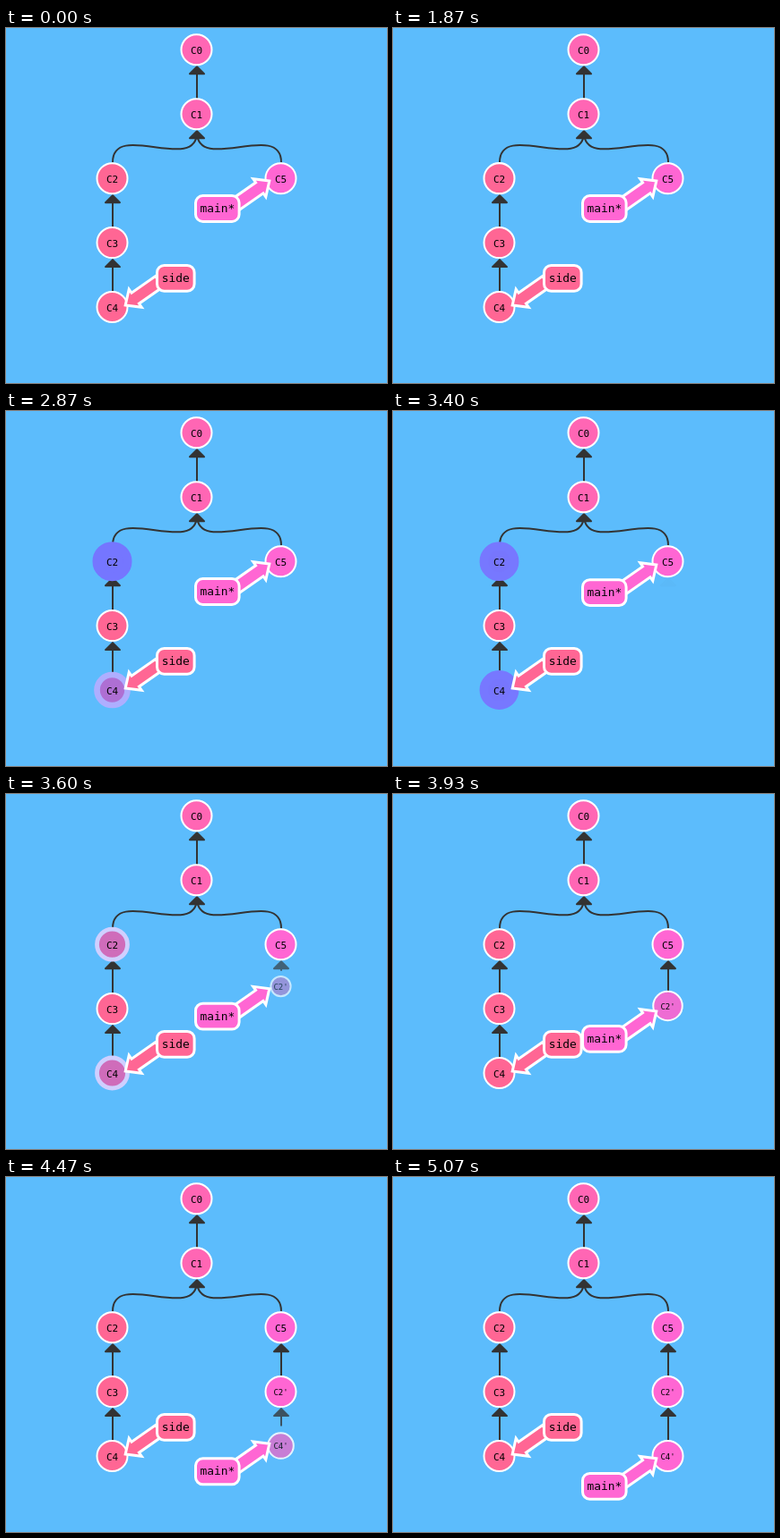
An HTML page that plays this animation: 425 by 397 pixels, repeating every 5140 ms.

```html
<!DOCTYPE html>
<html lang="en">
<head>
<meta charset="utf-8">
<title>Commit graph</title>
<style>
  html, body { margin: 0; width: 100%; height: 100%; overflow: hidden; background: #5cbcfc; }
  svg { display: block; }
  text { font-family: "DejaVu Sans Mono", "Noto Sans Mono", monospace; text-anchor: middle; fill: #000; }
  .edge { fill: none; stroke: #333; stroke-width: 2; }
  .head { fill: #333; stroke: #333; stroke-width: 2; stroke-linejoin: round; }
  .tag { stroke: #fff; stroke-width: 3; }
</style>
</head>
<body>
<svg id="stage" width="425" height="397" viewBox="0 0 425 397"></svg>
<script>
const LOOP = 5140, FPS = 15;
const LEFT = 118.5, MID = 212.5, RIGHT = 306.5;
const ROW = 71.93, R = 17;
const row = i => 24.3 + ROW * i;

const ROOT_FILL = [255, 102, 180], SIDE_FILL = [255, 102, 148], MAIN_FILL = [255, 102, 211];
const GLOW = [117, 118, 255], WHITE = [255, 255, 255], NEWBORN = [36, 179, 179];

// Start times and lengths in ms
const MOVE = 400, BIRTH = 800, HIGHLIGHT = 430;
const GLOW_C2 = 1838, GLOW_C4 = 2630, PICK_C2 = 3365, PICK_C4 = 4200;

const stage = document.getElementById('stage');

function add(parent, name, attrs, text) {
  const el = document.createElementNS('http://www.w3.org/2000/svg', name);
  set(el, attrs);
  if (text) el.textContent = text;
  parent.appendChild(el);
  return el;
}

function set(el, attrs) {
  for (const key in attrs) el.setAttribute(key, attrs[key]);
}

const rgb = c => `rgb(${c.map(Math.round).join(',')})`;
const mix = (a, b, p) => a.map((v, i) => v + (b[i] - v) * p);
const part = (t, start, length) => Math.min(1, Math.max(0, (t - start) / length));

function easeInOut(n) {
  if (n <= 0 || n >= 1) return n;
  const q = 0.48 - n / 1.04;
  const root = Math.sqrt(0.1734 + q * q);
  const s = Math.cbrt(root - q) + Math.cbrt(-root - q) + 0.5;
  return (1 - s) * 3 * s * s + s * s * s;
}

function bounce(n) {
  const k = 7.5625, d = 2.75;
  if (n < 1 / d) return k * n * n;
  if (n < 2 / d) return k * (n - 1.5 / d) ** 2 + 0.75;
  if (n < 2.5 / d) return k * (n - 2.25 / d) ** 2 + 0.9375;
  return k * (n - 2.625 / d) ** 2 + 0.984375;
}

function arrowHead(parent, x, y) {
  add(parent, 'path', { class: 'head', d: `M${x} ${y + 19}l8 8h-16z` });
}

function straightEdge(x, i) {
  const g = add(edges, 'g', {});
  const line = add(g, 'line', { class: 'edge', x1: x, x2: x, y1: row(i) + 24, y2: row(i + 1) - R });
  arrowHead(g, x, row(i));
  return { g, line };
}

function curvedEdge(x) {
  const y0 = row(2) - R - 1, y1 = row(1) + 20;
  add(edges, 'path', { class: 'edge', d: `M${x} ${y0}C${x} ${y0 - 47} ${MID} ${y1 + 47} ${MID} ${y1}` });
}

function node(id, x, i, fill) {
  const g = add(nodes, 'g', { transform: `translate(${x} ${row(i)})` });
  const circle = add(g, 'circle', { r: R, fill: rgb(fill), stroke: '#fff', 'stroke-width': 2 });
  const size = id.length > 2 ? 9 : 11;
  add(g, 'text', { y: size * 0.37 + 0.4, 'font-size': size }, id);
  return { g, circle, x, y: row(i), fill };
}

// The arrow points from the label to tipX, tipY; dir is 1 for right and up
function label(text, x, y, width, fill, tipX, tipY, dir) {
  const g = add(stage, 'g', {});
  const angle = dir > 0 ? -35 : 145;
  add(g, 'path', {
    class: 'tag', fill: rgb(fill),
    d: 'M0 0L-13.5 -12.3V-7.3H-46V7.3H-13.5V12.3Z',
    transform: `translate(${tipX} ${tipY}) rotate(${angle})`
  });
  add(g, 'rect', { class: 'tag', fill: rgb(fill), x: x - width / 2, y: y - 14.4, width, height: 28.8, rx: 8 });
  add(g, 'text', { x, y: y + 4.2, 'font-size': 12.9 }, text);
  return g;
}

// Edges sit half a pixel to the right of the node centres
const edges = add(stage, 'g', { transform: 'translate(0.5 0)' });
const nodes = add(stage, 'g', {});

straightEdge(MID, 0);
curvedEdge(LEFT);
curvedEdge(RIGHT);
arrowHead(edges, MID, row(1));
straightEdge(LEFT, 2);
straightEdge(LEFT, 3);

// Copies come first so that they emerge from behind their parents
const copies = [
  { node: node("C4'", RIGHT, 4, MAIN_FILL), edge: straightEdge(RIGHT, 3), start: PICK_C4 },
  { node: node("C2'", RIGHT, 3, MAIN_FILL), edge: straightEdge(RIGHT, 2), start: PICK_C2 }
];
node('C0', MID, 0, ROOT_FILL);
node('C1', MID, 1, ROOT_FILL);
node('C3', LEFT, 3, SIDE_FILL);
node('C5', RIGHT, 2, MAIN_FILL);
const picked = [
  { node: node('C2', LEFT, 2, SIDE_FILL), start: GLOW_C2 },
  { node: node('C4', LEFT, 4, SIDE_FILL), start: GLOW_C4 }
];
label('side', 189.3, 279.8, 41.6, SIDE_FILL, 133.2, 310, -1);
const mainLabel = label('main*', 235.8, 202, 48.6, MAIN_FILL, 293.8, 171, 1);

function drawPicked({ node, start }, t) {
  const p = easeInOut(part(t, start, HIGHLIGHT)) - easeInOut(part(t, PICK_C2, MOVE));
  set(node.circle, {
    fill: rgb(mix(node.fill, GLOW, p)),
    stroke: rgb(mix(WHITE, GLOW, p)),
    'stroke-width': 2 + 8 * p
  });
}

function drawCopy({ node, edge, start }, t) {
  const p = bounce(part(t, start, BIRTH));
  const grow = easeInOut(part(t, start, MOVE));
  set(node.g, { transform: `translate(${node.x} ${node.y - ROW * (1 - p)})`, opacity: p });
  set(node.circle, { r: R * p, fill: rgb(mix(NEWBORN, node.fill, p)) });
  set(edge.g, { opacity: grow });
  set(edge.line, { y2: node.y - R - ROW * (1 - grow) });
}

function draw(t) {
  picked.forEach(item => drawPicked(item, t));
  copies.forEach(item => drawCopy(item, t));
  const steps = easeInOut(part(t, PICK_C2, MOVE)) + easeInOut(part(t, PICK_C4, MOVE));
  set(mainLabel, { transform: `translate(0 ${ROW * steps})` });
}

const began = performance.now();
function tick() {
  const t = (performance.now() - began) % LOOP;
  draw(Math.floor(t * FPS / 1000 + 0.1) * 1000 / FPS);
  requestAnimationFrame(tick);
}
tick();
</script>
</body>
</html>
```
